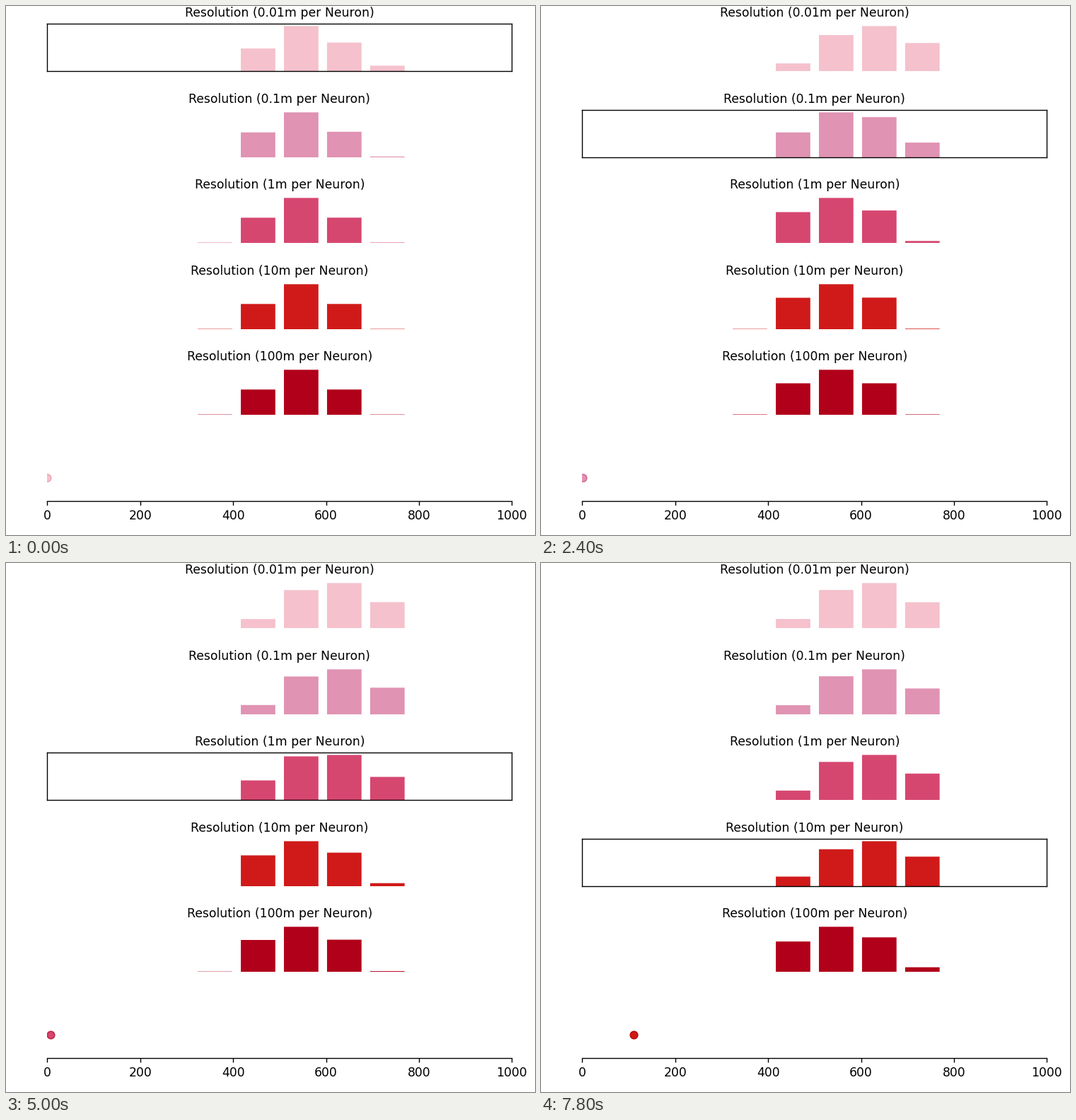
A matplotlib script that plays this animation: 748x748 px, repeating every 8000 ms.

```python
import numpy as np
import matplotlib.pyplot as plt
from matplotlib.animation import FuncAnimation

SIZE, INCHES = 748, 6
FRAMES, STEPS = 40, 10          # ten steps at each speed
LEFT, WIDTH, HEIGHT = 58.4, 657, 66.8
SCALES = [0.01, 0.1, 1, 10, 100]
COLORS = np.array([(245, 193, 204), (224, 147, 178), (214, 71, 112),
                   (208, 26, 26), (177, 0, 26)]) / 255
CELLS = np.arange(10)

plt.rcParams["font.family"] = "DejaVu Sans"
fig = plt.figure(figsize=(INCHES, INCHES), dpi=SIZE / INCHES,
                 facecolor="white")


def add_row(k):
    bottom = round(92.4 + 121.5 * k)
    return fig.add_axes([LEFT / SIZE, 1 - bottom / SIZE,
                         WIDTH / SIZE, HEIGHT / SIZE])


def distance(n):
    """Position after step n; the speed grows tenfold every STEPS steps."""
    return sum(SCALES[i // STEPS] for i in range(n + 1))


def bump(row, n):
    """Relative activity of one network: a clipped cosine around its centre."""
    u = distance(n) / SCALES[row]
    narrow = np.exp(-n / 4.5)   # the bump starts narrow and widens
    shift = min(0.078 * u, 0.755 + 0.9 / u) * (1 + narrow)
    r = u / 8
    reach = 2.011 + 0.24 * r / (1 + r * r)   # widest while it moves
    phase = np.clip(np.abs(CELLS - 5 - shift) / reach, 0, 1)
    act = np.cos(phase * np.pi / 2)
    act /= act.max()
    act[act < 1] *= 1 - 0.21 * narrow
    return act


rows, bars = [], []
for k, scale in enumerate(SCALES):
    ax = add_row(k)
    bars.append(ax.bar(CELLS, np.ones(10), color=COLORS[k], snap=False))
    ax.set_ylim(0, 1.05)
    ax.set_xticks([])
    ax.set_yticks([])
    ax.patch.set_visible(False)
    ax.set_title(f"Resolution ({scale:g}m per Neuron)", fontsize=10, pad=6)
    rows.append(ax)

track = add_row(5)
track.set_xlim(0, 1000)
track.set_ylim(-1, 1)
track.set_yticks([])
track.tick_params(labelsize=10)
track.spines[["left", "right", "top"]].set_visible(False)
dot = track.scatter([0], [0], s=36, linewidths=1)


def draw(n):
    active = n // STEPS
    for k, ax in enumerate(rows):
        ax.spines[:].set_visible(k == active)
        for bar, h in zip(bars[k], bump(k, n)):
            bar.set_height(h)
    dot.set_offsets([[distance(n), 0]])
    dot.set_facecolor(COLORS[active])
    dot.set_edgecolor(COLORS[active] ** 1.5)
    return [dot]


anim = FuncAnimation(fig, draw, frames=FRAMES, interval=200,
                     repeat=True, repeat_delay=0, blit=False)
plt.show()
```
